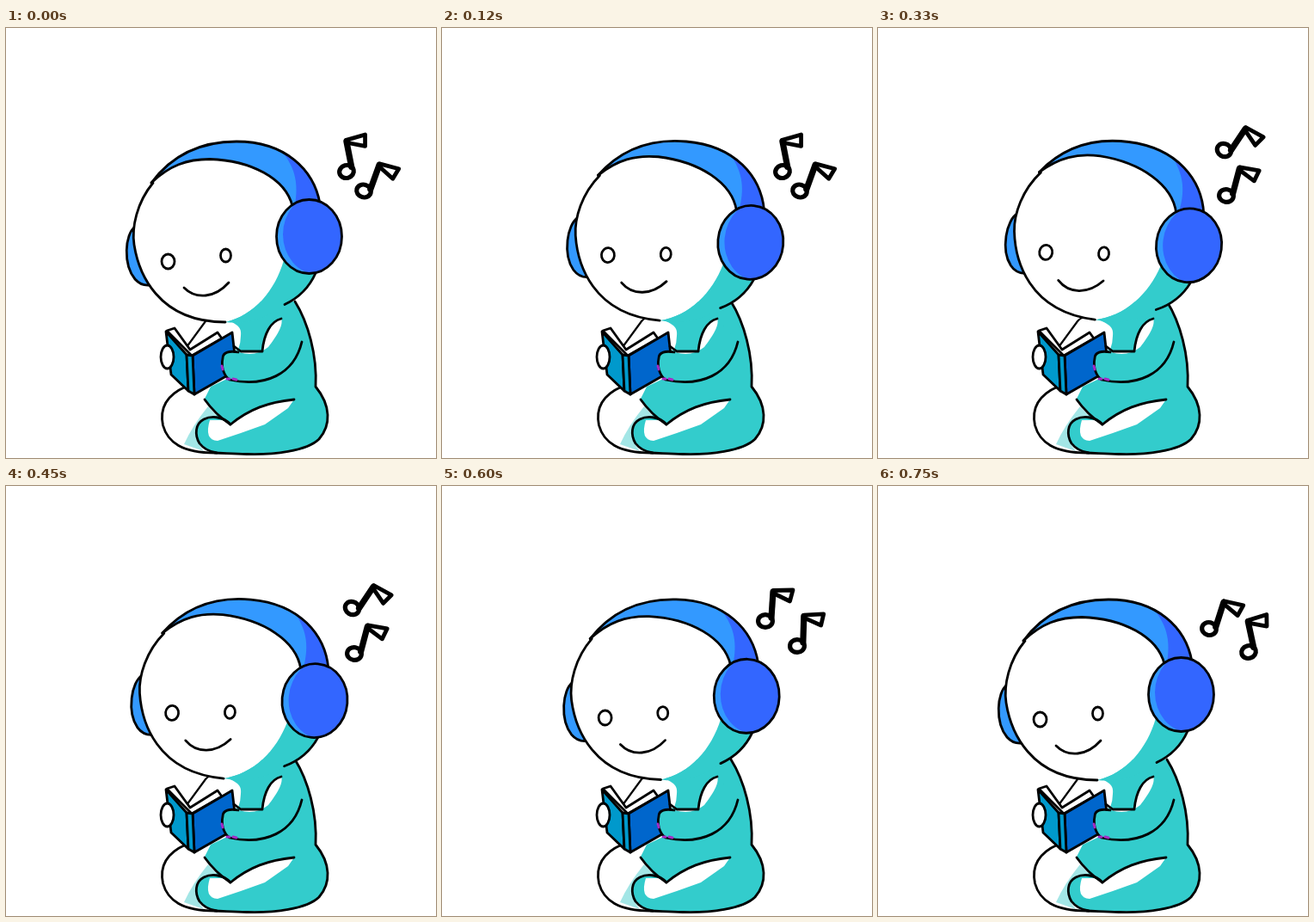
Recreate the animation shown at these times as an HTML page with a canvas. Size 500x500 px, loop 0.96 s.

```html
<!DOCTYPE html>
<html lang="en">
<head>
<meta charset="utf-8">
<title>Reading with music</title>
<style>
  html, body { margin: 0; width: 100%; height: 100%; overflow: hidden; background: #fff; }
  canvas { display: block; width: 500px; height: 500px; }
</style>
</head>
<body>
<canvas id="stage" width="500" height="500"></canvas>
<script>
const ctx = document.getElementById('stage').getContext('2d');
const LOOP = 960, STEP = 30, LAST = 750;
const PEAK = 285, REST = 720;
const WHITE = '#fff', TEAL = '#33cccc', SKY = '#3399ff', BLUE = '#3366ff';
const NECK = { x: 276, y: 319 }, TILT = 0.13;

// Each pose: start time, then x, y and angle in degrees for both notes.
const notePoses = [
  [0, [396, 167, -15], [416, 189.5, 16]],
  [180, [381, 154, 15], [421, 186, -4.5]],
  [330, [402.5, 142, 30], [405, 195, 11]],
  [540, [376, 157, 0], [413, 186, -2]],
  [690, [385, 166, 14], [431, 193, -16]]
];

function shape(d, fill, line, width = 2.8) {
  const path = new Path2D(d);
  if (fill) { ctx.fillStyle = fill; ctx.fill(path); }
  if (line) { ctx.strokeStyle = line; ctx.lineWidth = width; ctx.stroke(path); }
}

const stroke = (d, width) => shape(d, null, '#000', width);

function oval(x, y, rx, ry, fill, width = 2.8) {
  ctx.beginPath();
  ctx.ellipse(x, y, rx, ry, 0, 0, Math.PI * 2);
  if (fill) { ctx.fillStyle = fill; ctx.fill(); }
  if (width) { ctx.strokeStyle = '#000'; ctx.lineWidth = width; ctx.stroke(); }
}

function drawBody() {
  shape('M254 337 C264 344 275 345 273 358 Q273 366 270 374 L253 378 L257 408 L238 417 L231 431 L246 449 ' +
    'L238 454 C226 456 221 463 221 470 C222 484 230 492 243 494 C260 495 300 497 330 493 ' +
    'C365 488 374 470 374 450 Q373 431 360 417 C362 380 351 342 336 318 L290 318 Z', TEAL);
  shape('M235 440 L246 452 Q225 454 221 468 Q221 482 230 492 L207 484 Q217 462 235 440 Z', '#a3e6e6');
  shape('M237 453 Q223 455 221 468 Q222 484 240 494 L262 464 L254 455 Z', TEAL);
  shape('M237 456 L252 456 L261 461 C283 443 305 434 335 432 L328 442 L301 461 L273 471 L246 480 Q230 479 237 456 Z', WHITE);

  stroke('M336 318 C351 342 362 380 360 417 ' +
    'C378 439 378 462 364 478 C350 492 310 496.5 280 495.5 C262 495 250 494 243 494');
  stroke('M209 417 C184 428 179 445 182.5 462 C188 482 205 494 243 494');
  stroke('M231 432 Q243 449 261 461 C283 443 305 435 335 432');
  stroke('M261 461 C252 451 238 451 230 455 C220 460 219 473 225 483 Q232 492 245 494');
  stroke('M210 371 L232 341 Q235 337 241 336', 2.2);
}

function drawBook() {
  shape('M187 352 L196 349 L214 374 L246 354 L251 361 L216 381 Z', WHITE, '#000');
  shape('M186 353 L210 380 L212 422 L192 403 Z', '#0099cc', '#000');
  shape('M217 381 L263 354 L268 398 L219 426 Z', '#0066cc', '#000');
  shape('M210 380 L217 381 L219 426 L212 422 Z', '#0099cc', '#000');
}

function drawArms() {
  oval(187.5, 382.5, 7.5, 13.5, WHITE);
  shape('M271 377 C260 375 252 377 252 384 C250 394 252 404 260 409 ' +
    'C300 414 332 403 344 365 L320 338 L298 376 Z', TEAL);
  shape('M271 377 L298 376 C300 355 308 341 320 338 C323 345 315 358 305 371 Q290 383 271 377 Z', WHITE);
  stroke('M265 370 L273 376 L298 376 C300 355 308 341 320 338');
  stroke('M270 377 C260 375 252 377 252 384 C250 394 253 404 260 409 C301 418 335 403 344 365');
  shape('M251 393 L252 397 M257 408 L260 408 M264 408 L268 409', null, '#a32cc4', 3);
}

function drawHead(amount) {
  ctx.save();
  ctx.translate(NECK.x, NECK.y);
  ctx.rotate(TILT * amount);
  ctx.translate(-NECK.x, -NECK.y);

  shape('M150 231 C138 240 136 275 150 292 Q157 300 167 299 L160 240 Z', SKY, '#000');
  const face = 'M171 180 C152 203 146 232 149 252 C154 284 176 342 255 342';
  const cheek = 'C289 334 313 305 323 270';
  shape(`${face} ${cheek} L340 210 C325 175 285 154 237 153 Q200 154 171 180 Z`, WHITE);
  shape(`M255 342 ${cheek} L350 265 L360 285 C352 303 340 314 324 321.5 Q295 346 255 342 Z`, TEAL);
  stroke(face);
  stroke('M324 321.5 C340 314 352 303 360 285');

  const top = 'M169 180 C195 145 230 132 268 132 C325 132 358 165 365 204';
  shape(top + ' L333 207 C325 175 285 154 237 153 C210 153 190 160 169 180 Z', SKY);
  shape('M322 145 C337 164 340 182 336 206 L365 204 Q358 164 322 145 Z', BLUE);
  stroke(top);
  stroke('M169 180 C190 160 210 152.5 237 152.5 C285 154 325 175 333 207');

  oval(352.5, 242.5, 38, 43, SKY, 0);
  ctx.save();
  ctx.clip();
  oval(361, 240, 39, 46, BLUE, 0);
  ctx.restore();
  oval(352.5, 242.5, 38, 43);

  oval(188.5, 271.5, 7.5, 8.5, WHITE);
  oval(255.5, 264.5, 6, 7.5, WHITE);
  stroke('M207 302 C221 316 243 314 259 296');
  ctx.restore();
}

function drawNote([x, y, degrees]) {
  ctx.save();
  ctx.translate(x, y);
  ctx.rotate(degrees * Math.PI / 180);
  oval(0, 0, 8.4, 7.4, WHITE, 5.2);
  stroke('M7 -4 L9 -34', 7.2);
  stroke('M9 -35.5 L32 -36 L28.5 -23 L10 -32', 4.8);
  ctx.restore();
}

// Quick nod, slow return.
function tiltAt(t) {
  if (t < PEAK) return 1 - (1 - t / PEAK) ** 2;
  const back = Math.min((t - PEAK) / (REST - PEAK), 1);
  return (1 + Math.cos(Math.PI * back)) / 2;
}

function draw(now) {
  const t = Math.min(Math.floor(now % LOOP / STEP) * STEP, LAST);
  ctx.fillStyle = WHITE;
  ctx.fillRect(0, 0, 500, 500);
  ctx.lineCap = ctx.lineJoin = 'round';
  drawBody();
  drawHead(tiltAt(t));
  drawBook();
  drawArms();
  const [, first, second] = notePoses.findLast(([start]) => start <= t);
  drawNote(first);
  drawNote(second);
}

const begin = performance.now();
function tick() {
  draw(performance.now() - begin);
  requestAnimationFrame(tick);
}
tick();
</script>
</body>
</html>
```
